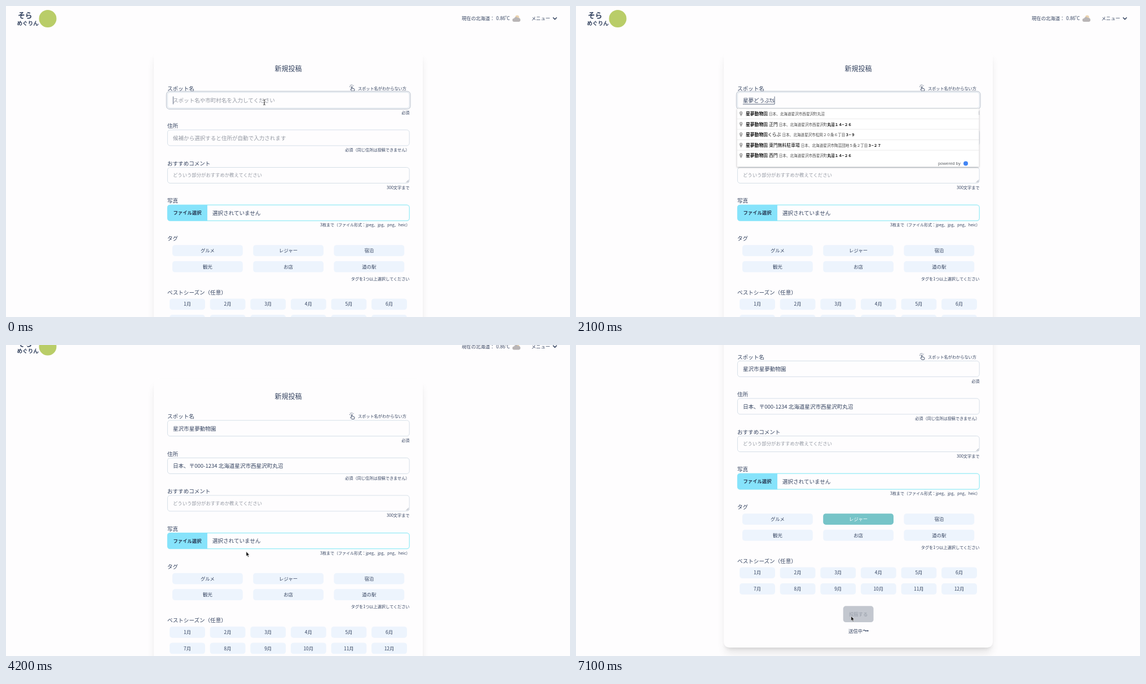
These frames come from a looping animation (1000x552 px, 7200 ms). An HTML page:

```html
<!DOCTYPE html>
<html lang="ja">
<head>
<meta charset="utf-8">
<title>新規投稿</title>
<style>
  html, body { margin: 0; width: 100%; height: 100%; overflow: hidden; background: #fefdfe; }
  #stage { position: relative; width: 1000px; height: 552px; overflow: hidden; background: #fefdfe; }
  #page { position: absolute; inset: 0; }
  #page > *, #mouse { position: absolute; left: 0; top: 0; }
  #card {
    left: 262px; top: 79px; width: 477px; height: 562px; border-radius: 9.5px; background: #fefdfe;
    box-shadow: 0 12px 15px -3px rgba(0,0,0,.1), 0 5px 6px -3.6px rgba(0,0,0,.1);
  }
  #foot { top: 674px; width: 1000px; height: 100px; background: #edf4fc; }
  .sent #card { height: 583px; }
  .sent #foot { top: 695px; }
  svg { display: block; overflow: visible; }
  text { font-family: "Noto Sans CJK JP", "Noto Sans CJK", sans-serif; fill: #33425f; white-space: pre; }
  .ph { fill: #9499a3; }
  .box { fill: #fefdfe; stroke: #ccd8e3; stroke-width: .8; }
  .file { stroke: #93ebf6; stroke-width: 1.2; }
  .chip { fill: #edf4fd; }
  .picked .chip { fill: #76c4c8; }
  .picked text { fill: #fff; }
  .line { fill: none; stroke: #33425f; stroke-linecap: round; stroke-linejoin: round; }
  .button { font-weight: 700; fill: #26354f; }
  #send rect { fill: #86e3fb; }
  #send.hover rect { fill: #70bfd3; }
  .sent #send rect { fill: #c3c7cf; }
  .sent #send text { fill: #a5abb5; }
  #status { display: none; }
  .sent #status { display: inline; }
  #drop text, #drop tspan { font-family: "Liberation Sans", "Noto Sans CJK JP", sans-serif; }
  #panel { fill: #fff; filter: drop-shadow(0 1.2px 1.8px rgba(0,0,0,.32)); }
  .name { font-size: 7.8px; font-weight: 500; fill: #000; }
  .addr { font-size: 6.6px; fill: #444; }
  .bold { font-weight: 700; fill: #111; }
</style>
</head>
<body>
<div id="stage">
  <div id="page">
    <div id="card"></div>
    <div id="foot"></div>
    <svg id="view" width="1000" height="760"></svg>
  </div>
  <svg id="mouse" width="1000" height="552">
    <g id="beam"><path d="M-1.8-4.6Q0-4.6 0-3.4Q0-4.6 1.8-4.6M0-3.6V3.6M-1.8 4.6Q0 4.6 0 3.4Q0 4.6 1.8 4.6M-1 .9H1" fill="none" stroke="#222" stroke-width=".9"/></g>
    <g id="arrow"><path d="M0 0V8.4L1.9 6.7L3.2 9.8L4.6 9.2L3.3 6.2H5.9Z" fill="#111" stroke="#fff" stroke-width=".6"/></g>
    <g id="hand"><path d="M-.9 1Q0-.2.9 1V4Q1.8 3.2 2.4 4.2Q3.3 3.6 3.7 4.6Q4.8 4.2 4.8 5.6Q4.8 8 3.6 9.8H-.6Q-1.4 8.4-2.8 6.6Q-3 5.2-1.7 5.6L-.9 6.4Z" fill="#fff" stroke="#222" stroke-width=".8"/><path d="M.8 6.4V8.4M2 6.4V8.4M3.2 6.4V8.4" stroke="#222" stroke-width=".4"/></g>
  </svg>
</div>
<script>
const LOOP = 7200, STEP = 100, CLICK = 3900, PICK = 5100, SEND = 5900;
const $ = id => document.getElementById(id);
const S = 7.16, M = 8.36, L = 9.55;

// cy is the middle of the line
const text = (x, cy, size, str, attr = "") =>
  `<text x="${x}" y="${cy + size * .37}" font-size="${size}" ${attr}>${str}</text>`;
const mid = 'text-anchor="middle"', end = 'text-anchor="end"';
const rect = (x, y, w, h, r, attr) =>
  `<rect x="${x}" y="${y}" width="${w}" height="${h}" rx="${r}" ${attr}/>`;
const field = (y, kind = "") => rect(286.4, y, 428.8, 28, 4.6, `class="box ${kind}"`);
const chip = (cx, cy, w, str, id = "") =>
  `<g ${id && `id="${id}"`}>${rect(cx - w / 2, cy - 10, w, 19.8, 4.7, 'class="chip"')}${text(cx, cy, M, str, mid)}</g>`;

function header() {
  return text(21, 16.5, 12.8, "そら", 'font-weight="700"')
    + text(19.5, 30, 9.6, "めぐりん", 'font-weight="700"')
    + '<circle cx="74" cy="22.5" r="15.5" fill="#b9cd68"/>'
    + text(808, 22.3, M, "現在の北海道：") + text(869, 22.3, M, "0.86˚C")
    + '<circle cx="906.4" cy="20" r="3.4" fill="#ecd3ae"/>'
    + '<path d="M901 28a3 3 0 0 1-.2-6a4 4 0 0 1 7-.8a3.4 3.4 0 0 1 1.6 6.8Z" fill="#b9b5b6"/>'
    + text(931.5, 22.3, M, "メニュー")
    + '<path class="line" d="M970.3 20.8L973.2 23.7L976.1 20.8" stroke-width="1.6"/>';
}

function form() {
  const tags = ["グルメ", "レジャー", "宿泊", "観光", "お店", "道の駅"];
  return text(500.5, 111.5, 11.94, "新規投稿", mid + ' font-weight="500"')
    + text(286, 146, L, "スポット名")
    + '<path class="line" d="M612.4 147.6V143.4Q613.2 142.4 614 143.4V146.2L617 146.8Q618.2 147.2 618 148.6L617.2 151H613L610.8 148.2Q611 147 612.4 147.6M610.2 143.4L609.4 143M611 141.2L610.6 140.4M613.2 140.6V139.8M615.4 141.6L616 141" stroke-width=".9"/>'
    + text(624, 146, S, "スポット名がわからない方")
    + rect(284.4, 151.4, 432.6, 31.8, 6, 'id="ring" fill="none" stroke="#c3cad4" stroke-width="1.2"')
    + field(153.3) + text(296, 167.5, L, "", 'id="spot"')
    + '<path id="under" class="line" stroke-width=".8"/><path id="caret" class="line" stroke-width=".8"/>'
    + text(715.5, 189, S, "必須", end)
    + text(286, 212.6, L, "住所") + field(219.9) + text(296, 234.3, L, "", 'id="place"')
    + text(715.5, 255.5, S, "必須（同じ住所は投稿できません）", end)
    + text(286, 279.3, L, "おすすめコメント") + field(286.5)
    + text(296, 300.3, M, "どういう部分がおすすめか教えてください", 'class="ph"')
    + '<path class="line" d="M709.8 313L713.8 309M712 313L713.8 311.2" stroke-width=".5"/>'
    + text(715.5, 322.2, S, "300文字まで", end)
    + text(286, 345.8, L, "写真") + field(353.1, "file")
    + '<path d="M357 352.9V381.3H291Q286 381.3 286 376.3V357.9Q286 352.9 291 352.9Z" fill="#86e3fb"/>'
    + text(321.5, 367.3, M, "ファイル選択", mid + ' class="button"')
    + text(366, 367, L, "選択されていません")
    + text(557, 388.8, 7, "3枚まで（ファイル形式：jpeg、jpg、png、heic）")
    + text(286, 412.5, L, "タグ")
    + tags.map((s, i) => chip(357.4 + i % 3 * 143.2, 434.2 + (i > 2) * 28.6, 124.8, s, i == 1 ? "tag" : "")).join("")
    + text(715.5, 484, S, "タグを1つ以上選択してください", end)
    + text(286, 508, L, "ベストシーズン（任意）")
    + [...Array(12).keys()].map(i => chip(321.5 + i % 6 * 71.6, 529.4 + (i > 5) * 28.6, 62.8, i + 1 + "月")).join("")
    + `<g id="send">${rect(473.7, 588.3, 53.8, 28.8, 4.7, "")}${text(500.6, 602.8, M, "投稿する", mid + ' class="button"')}</g>`
    + `<g id="status">${text(483, 632.5, M, "送信中")}${[0, 1, 2].map(i =>
        `<circle class="dot" cx="${510.8 + i * 3.2}" r="1.2" fill="#33425f"/>`).join("")}</g>`;
}

// each row: name|address, with *bold* parts
const firstHits = [
  "*Y*ONA class|日本、大阪府花見市西浜区*星*１丁目*３−６*",
  "*HOTEL K4 The Pond 星市口*|日本、千葉県星市*ロ６１２−９*",
  "*Y*AO 3 Pantry (ヤオサンパントリー)|日本、大阪府花見市*星*区新浜２丁目*１−４５*",
  "*Ｙ*ＯＮＤＥＲ体操教室 月ヶ原店|日本、神奈川県花浜市*星*区月ケ原４丁目*２−３０*",
  "*Y*ora Sushi|１丁目-*3-7 星* 西浜区 花見市 大阪府 日本"
];
const town = "日本、北海道星沢市";
const zooHits = [
  `園|${town}西星沢町丸沼`,
  `園 正門|${town}西星沢町*丸沼１４−２６*`,
  `園くらぶ|${town}松岡２０条６丁目*３−９*`,
  `園 東門無料駐車場|${town}陶芸団地５条２丁目*３−２７*`,
  `園 西門|${town}西星沢町*丸沼１４−２６*`
].map(s => "*星夢動物*" + s);

const marked = s => s.split("*").map((p, i) => i % 2 ? `<tspan class="bold">${p}</tspan>` : p).join("");
function hits(id, rows) {
  return `<g id="${id}">` + rows.map((row, i) => {
    const [name, addr] = row.split("|");
    return `<text x="301" y="${194 + i * 18.55}"><tspan class="name">${marked(name)}</tspan><tspan class="addr" dx="2">${marked(addr)}</tspan></text>`;
  }).join("") + "</g>";
}
function dropdown() {
  const pins = [0, 1, 2, 3, 4].map(i => {
    const y = 191 + i * 18.55;
    return `<path transform="translate(292.6 ${y})" d="M0 5Q-2.7 1-2.7-1.2A2.7 2.7 0 0 1 2.7-1.2Q2.7 1 0 5ZM0-2.3A1 1 0 0 0 0-.3A1 1 0 0 0 0-2.3Z" fill="#a3a3a3" fill-rule="evenodd"/>`
      + (i ? `<path d="M285.5 ${y - 9.2}H714.5" stroke="#e3e3e3" stroke-width=".7"/>` : "");
  }).join("");
  return `<g id="drop">${rect(285.5, 182, 429, 103.6, 1, 'id="panel"')}`
    + rect(285.5, 182.2, 429, 18.3, 0, 'id="row" fill="#f5f5f6"')
    + '<path d="M285.5 182.2H714.5" stroke="#d4d4d4" stroke-width=".7"/>'
    + pins + hits("first", firstHits) + hits("zoo", zooHits)
    + text(642, 279, 7.7, "powered by", 'style="fill:#5f6368"')
    + '<circle cx="691" cy="279.4" r="4" fill="#4285f4"/></g>';
}
$("view").innerHTML = header() + form() + dropdown();

const typed = [
  [300, "h"], [400, "ほ"], [500, "ほs"], [800, "星"], [900, "星y"], [1000, "星ゆ"], [1100, "星ゆm"],
  [1200, "星夢"], [1500, "星夢d"], [1600, "星夢ど"], [1700, "星夢どう"], [1800, "星夢どうb"],
  [1900, "星夢どうぶ"], [2000, "星夢どうぶt"], [2100, "星夢どうぶts"], [2200, "星夢動物"],
  [2400, "星夢動物え"], [2600, "星夢動物えn"], [2800, "星夢動物園"], [CLICK, "星沢市星夢動物園"]
];
// time, x, y of the pointer
const path = [
  [0, 458, 171], [3200, 458, 171], [3600, 464.4, 189.8], [CLICK, 464.4, 189.8], [4200, 425.9, 366.6],
  [4700, 425.9, 366.6], [5000, 492, 305], [PICK, 492, 305], [5500, 487.7, 481.2], [LOOP, 487.7, 481.2]
];
const smooth = u => u * u * (3 - 2 * u);
const clamp = u => Math.min(1, Math.max(0, u));
function pointer(t) {
  const i = path.findIndex(p => p[0] > t), [a, x, y] = path[i - 1], [b, x2, y2] = path[i];
  const u = smooth((t - a) / (b - a));
  return [x + (x2 - x) * u, y + (y2 - y) * u];
}
const show = (el, on) => el.style.display = on ? "" : "none";

function setText(t) {
  const now = typed.filter(p => p[0] <= t).pop(), spot = $("spot"), place = $("place"), filled = t >= CLICK;
  spot.textContent = now ? now[1] : "スポット名や市町村名を入力してください";
  spot.setAttribute("class", now ? "" : "ph");
  place.textContent = filled ? "日本、〒000-1234 北海道星沢市西星沢町丸沼" : "候補から選択すると住所が自動で入力されます";
  place.setAttribute("class", filled ? "" : "ph");
  const x = 296 + (now ? spot.getComputedTextLength() : 0);
  $("under").setAttribute("d", `M296.2 174.2H${x - .2}`);
  $("caret").setAttribute("d", `M${x + .4} 161V174`);
  show($("under"), now && t < 3000);
  show($("caret"), t < 3500);
  show($("ring"), t < 4100);
}

function draw(time) {
  const t = Math.floor(time % LOOP / STEP) * STEP;
  const [x, y] = pointer(t), sent = t >= SEND;
  setText(t);
  show($("drop"), t >= 900 && t < CLICK);
  show($("first"), t < 1800);
  show($("zoo"), t >= 1800);
  show($("row"), t > 3200 && y > 182);
  $("page").style.transform = `translateY(${-125 * smooth(clamp((t - 4100) / 400))}px)`;
  $("stage").classList.toggle("sent", sent);
  $("tag").classList.toggle("picked", t >= PICK);
  const onTag = t > 4700 && Math.abs(y - 309) < 10 && x > 438;
  const onSend = t > PICK && y > 463;
  $("send").classList.toggle("hover", onSend);

  const kind = y < 182 ? "beam" : !sent && (onTag || onSend) ? "hand" : "arrow";
  for (const id of ["beam", "arrow", "hand"]) {
    show($(id), id == kind && (t < 300 || t >= 3200));
    $(id).setAttribute("transform", `translate(${x} ${y})`);
  }
  document.querySelectorAll(".dot").forEach((dot, i) => {
    const u = clamp(((t - 5835 + LOOP) % 1050 - i * 100) / 600);
    const v = 1 - Math.abs(2 * u - 1);
    dot.setAttribute("cy", 632.3 - 2.4 * (1 - (1 - v) ** 2));
  });
}

function tick() {
  draw(performance.now());
  requestAnimationFrame(tick);
}
tick();
</script>
</body>
</html>
```
